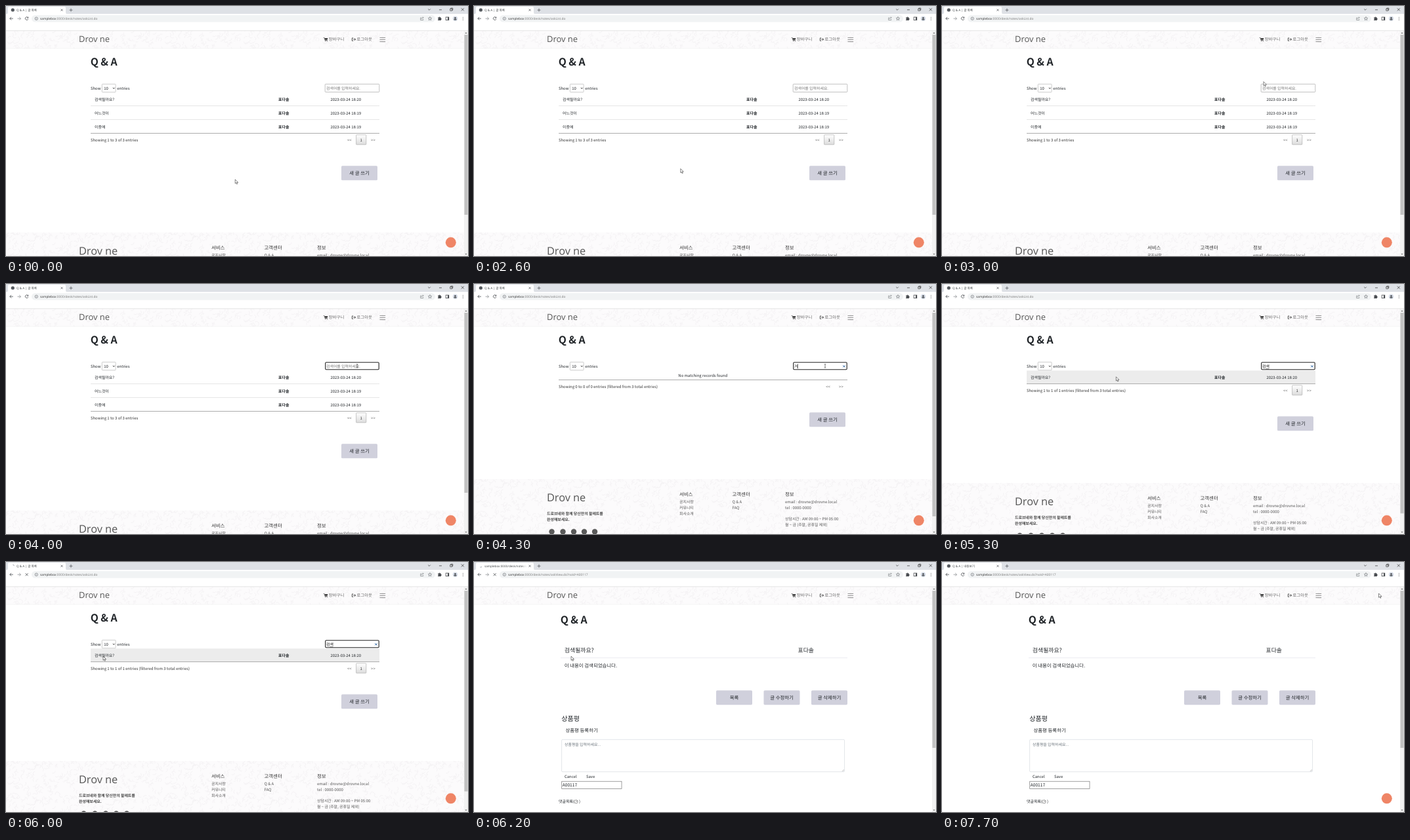
An HTML page for the animation above (7800 ms loop, 704 by 382 pixels).

```html
<!DOCTYPE html>
<html>
<head>
<meta charset="utf-8">
<style>
html, body { margin: 0; width: 100%; height: 100%; overflow: hidden; background: #fff; }
svg { display: block; width: 100vw; height: 100vh; }
text { font-family: "Noto Sans CJK KR", "Noto Sans CJK", "Noto Sans KR", "Noto Sans", sans-serif; white-space: pre; text-rendering: geometricPrecision; }
.ui { font-family: "Open Sans", "Noto Sans CJK KR", "Noto Sans CJK", sans-serif; }
</style>
</head>
<body>
<svg id="stage" viewBox="0 0 704 382" xmlns="http://www.w3.org/2000/svg"></svg>
<script>
const LOOP = 7800, STEP = 100, BODY = 5.93, MID = 7.4;
const INK = '#212529', BRAND = 'Drov ne', WRITER = '표다솔';

const text = (x, cy, str, size = BODY, fill = INK, extra = '') =>
  `<text x="${x}" y="${cy + size * 0.36}" font-size="${size}" fill="${fill}" ${extra}>${str}</text>`;
const center = (x, cy, str, size, fill, extra = '') => text(x, cy, str, size, fill, 'text-anchor="middle" ' + extra);
const rect = (x, y, w, h, fill, extra = '') =>
  `<rect x="${x}" y="${y}" width="${w}" height="${h}" fill="${fill}" ${extra}/>`;
const circle = (x, y, r, fill, extra = '') => `<circle cx="${x}" cy="${y}" r="${r}" fill="${fill}" ${extra}/>`;
const line = (d, stroke, width = 0.7, extra = '') =>
  `<path d="${d}" fill="none" stroke="${stroke}" stroke-width="${width}" ${extra}/>`;
const group = (id, body) => `<g id="${id}">${body}</g>`;
const button = (x, y, label) =>
  rect(x, y, 55, 22, '#d0d0dc', 'rx="1.6"') + center(x + 27.5, y + 11, label, MID);
const BOLD = 'font-weight="700"', MEDIUM = 'font-weight="500"', UI = 'class="ui"';

// Seeded squiggles used behind the header and footer
function squiggles() {
  let seed = 11, d = '';
  const rnd = () => (seed = (seed * 16807) % 2147483647) / 2147483647;
  for (let i = 0; i < 170; i++) {
    const x = 2 + rnd() * 116, y = rnd() * 54, a = rnd() * 6.28, c = Math.cos(a) * 5, s = Math.sin(a) * 5;
    d += `M${x.toFixed(1)} ${y.toFixed(1)}q${(c / 2 - s / 2).toFixed(1)} ${(s / 2 + c / 2).toFixed(1)} ${c.toFixed(1)} ${s.toFixed(1)}`;
  }
  return line(d, '#f5f3f5', 1, 'stroke-linecap="round"');
}

function defs() {
  return `<defs><pattern id="wavy" width="120" height="54" patternUnits="userSpaceOnUse">${rect(0, 0, 120, 54, '#fcfbfc')}${squiggles()}</pattern>
    <linearGradient id="page" x2="0" y2="1"><stop stop-color="#fff"/><stop offset="1" stop-color="#dcdcdc"/></linearGradient>
    <linearGradient id="tabFade"><stop stop-color="#fff" stop-opacity="0"/><stop offset="1" stop-color="#fff"/></linearGradient></defs>`;
}

function browser() {
  const dark = '#4a4d51';
  return rect(0, 0, 704, 12.3, '#dee1e6') +
    rect(0, 12, 704, 26, '#fff') +
    `<path d="M0 12.5q3 0 3-3V3q0-2 2-2h84q2 0 2 2v6.5q0 3 3 3z" fill="#fff"/>` +
    group('favicon', circle(10.3, 6, 2.6, '#55595e')) +
    group('tabSpin', line('M10.3 4a2 2 0 0 1 2 2', '#8a9099', 0.7)) +
    `<text id="tabTitle" class="ui" x="16" y="7.8" font-size="4.6" fill="#3c4043"></text>` +
    rect(72, 2, 9, 9, 'url(#tabFade)') + rect(81, 2, 8, 9, '#fff') +
    line('M83.5 4.7l3 3m0-3l-3 3', dark) + line('M99 3.7v5m-2.5-2.5h5', dark) +
    line('M643.2 4.5l1.8 1.8 1.8-1.8M660 5.8h4M676.8 4.2h3v3h-3zM677.8 4.2v-1h3v3h-1M693.8 3.4l4 4m0-4l-4 4', '#333', 0.7) +
    rect(39, 14, 615, 10.4, '#f1f3f4', 'rx="5.2"') +
    line('M10.8 19.2H5.8m2.3-2.3l-2.3 2.3 2.3 2.3', dark, 0.8) +
    line('M17.5 19.2h5m-2.3-2.3l2.3 2.3-2.3 2.3', '#8b8e92', 0.8) +
    group('reload', line('M33.5 17.7a2.3 2.3 0 1 0 .3 2.2M33.8 16.5v1.8h-1.8', dark, 0.8)) +
    group('stop', line('M29.6 17.2l4 4m0-4l-4 4', dark, 0.8)) +
    circle(46.3, 19.2, 2.2, 'none', 'stroke="#5f6368" stroke-width=".6"') + line('M46.3 18.9v1.5m0-2.4v.6', '#5f6368', 0.5) +
    `<text class="ui" x="52" y="21" font-size="4.8" fill="#777">` +
    `<tspan fill="#333">samplebox</tspan><tspan id="path"></tspan></text>` +
    line('M633 18h-1.3v3.5h4V20m-2.7 0q0-2.2 3-2.3m-1-1.2l1.2 1.2-1.2 1.2', '#5f6368', 0.55) +
    line('M646 16.5l.8 1.7 1.9.2-1.4 1.3.4 1.9-1.7-1-1.7 1 .4-1.9-1.4-1.3 1.9-.2z', '#5f6368', 0.6) +
    `<path d="M658.2 17.5h1.5a.9.9 0 0 1 1.8 0h1.4v1.4a.9.9 0 0 1 0 1.8v1.3h-4.7v-1.4a.8.8 0 0 0 0-1.6z" fill="${dark}"/>` +
    rect(670.2, 17, 4.6, 4.6, 'none', `stroke="${dark}" stroke-width=".8"`) + rect(673, 17, 2, 4.6, dark) +
    circle(684.5, 19.2, 3.7, '#d5dbe6') + circle(684.5, 18.2, 1.2, dark) + rect(682.5, 19.8, 4, 1.7, dark, 'rx=".8"') +
    [17.2, 19.2, 21.2].map(y => circle(696.3, y, 0.5, dark)).join('') +
    rect(0, 37.4, 704, 0.8, '#dcdcdc');
}

function header() {
  const grey = '#6a6a6a';
  return rect(0, 38.2, 698, 26.8, 'url(#wavy)') + rect(0, 64.7, 698, 0.5, '#ebebeb') +
    text(111, 50.5, BRAND, 12.9, '#555', UI) +
    line('M483.8 48.5h1.3l1 4h3.6', '#444', 0.7) + `<path d="M485.4 49h5l-.7 2.7h-3.7z" fill="#444"/>` +
    circle(486.7, 53.6, 0.6, '#444') + circle(489.2, 53.6, 0.6, '#444') +
    text(491.8, 51, '장바구니', 6.4, grey) +
    line('M529.2 48.9h-1.8v4.3h1.8M529.2 51h3.3m-1.5-1.7l1.7 1.7-1.7 1.7', '#444', 0.9) +
    text(534.3, 51, '로그아웃', 6.4, grey) +
    line('M569.5 48.4h8.7m-8.7 3h8.7m-8.7 3.1h8.7', '#555', 0.65);
}

function row(i, title, minute) {
  const y = 142.4 + 21 * i;
  return group('row' + i, text(135, y, title) + text(415, y, WRITER, BODY, INK, BOLD) +
    text(494.5, y, '2023-03-24 18:' + minute) + (i < 2 ? rect(129, 152 + 21 * i, 440, 1, '#e6e6e6') : ''));
}

function footer() {
  const heads = [[313, '서비스'], [393.5, '고객센터'], [474, '정보']];
  const items = [
    [313, 381, '공지사항'], [313, 389.8, '커뮤니티'], [313, 398.6, '회사소개'],
    [393.5, 381, 'Q &amp; A'], [393.5, 389.8, 'FAQ'],
    [474, 381, 'email : drovne@drovne.local'], [474, 389.8, 'tel : 0000-0000'],
    [474, 407.3, '상담시간 : AM 09:00 ~ PM 05:00'], [474, 416, '월 ~ 금 (주말, 공휴일 제외)']];
  return rect(0, 346, 698, 100, 'url(#wavy)') +
    text(111, 373.7, BRAND, 16.3, '#555', UI) +
    heads.map(([x, s]) => text(x, 369.3, s, MID, '#333', MEDIUM)).join('') +
    items.map(([x, y, s]) => text(x, y, s, BODY, '#555')).join('') +
    text(111, 399.3, '드로브네와 함께 당신만의 팔레트를', BODY, '#444', BOLD) +
    text(111, 408, '완성해보세요.', BODY, '#444', BOLD) +
    [118.5, 135.5, 152, 168, 184].map(x => circle(x, 426.5, 4.2, '#5a5a5a')).join('');
}

function listPage() {
  return text(128.7, 85, 'Q &amp; A', 15.7, INK, BOLD) +
    text(129, 125.8, 'Show') + text(169.3, 125.8, 'entries') +
    rect(146.3, 119.3, 20.8, 12.4, '#fff', 'rx="1" stroke="#aaa" stroke-width=".6"') +
    text(149.2, 125.8, '10') + line('M162.8 124.8l1.5 1.5 1.5-1.5', '#222', 0.9) +
    group('idleField', rect(486.2, 119.3, 82.6, 12.2, '#fff', 'rx="1" stroke="#999" stroke-width=".6"')) +
    group('focusField', rect(486.7, 119.8, 81.5, 11, '#fff', 'rx="1.2" stroke="#222" stroke-width="1.1"')) +
    `<text id="query" x="488" y="127.7" font-size="${BODY}"></text>` +
    group('compose', rect(493.4, 129.1, 5, 0.5, '#333')) +
    group('clear', line('M562.3 124.3l3 3m0-3l-3 3', '#1b5799', 0.9)) +
    `<rect id="caret" y="122" width=".5" height="7.5" fill="#111"/>` +
    `<rect id="hover" x="129" y="132.3" width="440" height="20.3" fill="#ececec"/>` +
    row(0, '검색될까요?', 20) + row(1, '어느것이', 19) + row(2, '이중에', 19) +
    group('none', center(348.8, 139.8, 'No matching records found')) +
    group('lower', rect(129, 194, 440, 1, '#adadad') +
      `<text id="info" x="129" y="206.6" font-size="${BODY}" fill="#333"></text>` +
      `<text id="prev" y="206.8" font-size="${BODY}" fill="#666" text-anchor="middle">&lt;&lt;</text>` +
      center(559.4, 204.6, '&gt;&gt;', BODY, '#666') +
      group('one', rect(533.6, 196.8, 15.2, 15, 'url(#page)', 'rx=".7" stroke="#a5a5a5" stroke-width=".6"') + center(541.2, 204.5, '1', BODY, '#333')) +
      button(511, 244.3, '새 글 쓰기') + footer());
}

function viewPage() {
  return text(131.7, 88, 'Q &amp; A', 15.7, INK, BOLD) +
    text(137.8, 134.5, '검색될까요?', 8.9) + text(493.6, 134.5, WRITER, 8.8) +
    rect(132, 146.2, 437, 0.6, '#dfe0ea') +
    text(137.8, 158.5, '이 내용이 검색되었습니다.', MID) +
    button(369, 196.2, '목록') + button(441.5, 196.2, '글 수정하기') + button(514, 196.2, '글 삭제하기') +
    text(133.3, 239.5, '상품평', 10, INK, MEDIUM) + text(139.5, 257.3, '상품평 등록하기', MID) +
    rect(133.6, 271.3, 431, 49.3, '#fff', 'rx="1.5" stroke="#ced4da" stroke-width=".6"') +
    line('M563.7 317l-2.8 2.8m2.8-1.3l-1.3 1.3', '#777', 0.4) +
    text(138, 279, '상품평을 입력하세요...', BODY, '#6c757d') +
    text(138, 328.2, 'Cancel') + text(171, 328.2, 'Save') +
    rect(133.7, 335.2, 91.3, 11.2, '#fff', 'stroke="#777" stroke-width=".7"') +
    text(134.8, 341, 'A00117', 6.6) +
    text(129, 366.2, '댓글목록(', BODY, INK, MEDIUM) + text(160, 366.2, ')', BODY, INK, MEDIUM) +
    circle(155.6, 366.2, 2.6, 'none', 'stroke="#333" stroke-width=".5"') +
    group('hand', line('M155.6 366.2v-2.1', '#333', 0.6));
}

function scrollbar() {
  return rect(698, 38.2, 6, 344, '#f1f1f1') +
    `<path d="M699.5 42l1.5-1.7 1.5 1.7zM699.5 378.5l1.5 1.7 1.5-1.7z" fill="#666"/>` +
    `<rect id="thumb" x="698.5" y="44" width="5" fill="#c1c1c1"/>`;
}

const pointer = `<path d="M0 0v6.2l1.4-1.3 1 2.3 1.1-.5-1-2.2h2z" fill="#fff" stroke="#222" stroke-width=".55"/>`;
const beam = line('M-1.2 -2.8q1.2 0 1.2 .6v4.4q0 .6-1.2 .6M1.2 -2.8q-1.2 0-1.2 .6m0 4.4q0 .6 1.2 .6', '#222', 0.6);

const stage = document.getElementById('stage');
stage.innerHTML = defs() + rect(0, 0, 704, 382, '#fff') + group('list', listPage()) + group('view', viewPage()) +
  header() + browser() + scrollbar() + group('badge', circle(677.8, 361.3, 8, '#ef8566')) +
  group('arrow', pointer) + group('beam', beam);

const el = {};
stage.querySelectorAll('[id]').forEach(n => el[n.id] = n);
const show = (id, on) => el[id].setAttribute('visibility', on ? 'inherit' : 'hidden');
const set = (id, name, v) => el[id].setAttribute(name, v);
const place = (id, x, y) => set(id, 'transform', `translate(${x} ${y})`);
const label = (id, s) => { if (el[id].textContent !== s) el[id].textContent = s; };

// time, x, y of the mouse
const mouse = [
  [0, 349.2, 265], [2599, 349.2, 265], [2600, 314.8, 248.6], [2700, 284, 233], [2800, 310, 208], [2900, 410, 155],
  [3000, 490, 115.6], [3100, 520, 117], [3200, 532, 122], [3300, 535, 125.3], [5100, 535, 125.3],
  [5200, 420, 132], [5300, 265.3, 141.8], [5400, 200, 145.5], [5500, 165, 145.5], [5700, 148, 144],
  [6500, 148, 144], [6700, 215, 128], [7000, 440, 91], [7200, 600, 60], [7400, 665.5, 48], [7800, 665.5, 48]];

function mouseAt(t) {
  const i = mouse.findIndex(m => m[0] > t), a = mouse[i - 1], b = mouse[i];
  const k = (t - a[0]) / (b[0] - a[0]);
  return [a[1] + (b[1] - a[1]) * k, a[2] + (b[2] - a[2]) * k];
}

// start time, typed text, rows left
const typing = [[0, '', 3], [4300, '거', 0], [4400, '검', 1], [4500, '검ㅅ', 0], [4600, '검새', 0], [4700, '검색', 1]];

function render(time) {
  const t = Math.floor(time / STEP) * STEP;
  const [, query, rows] = typing.filter(k => k[0] <= t).pop();
  const view = t >= 6100, loading = t >= 6000 && t < 6600, focus = t >= 3400;
  const lift = rows === 3 ? 0 : rows ? -42 : -48;

  show('list', !view);
  show('view', view);
  show('badge', !view || !loading);
  show('favicon', !loading);
  show('tabSpin', loading);
  set('tabSpin', 'transform', `rotate(${t * 0.6} 10.3 6)`);
  show('reload', !loading);
  show('stop', loading);
  label('tabTitle', !view ? 'Q & A | 글 목록' : loading ? 'samplebox:0000/desk/notes/ask' : 'Q & A | 내용보기');
  label('path', ':0000/desk/notes/' + (view ? 'askView.do?noId=A00117' : 'askList.do'));
  set('thumb', 'height', view ? 240 : 275 - lift * 0.75);

  if (view) {
    set('hand', 'transform', `rotate(${Math.min(t, 7400) * 0.3} 155.6 366.2)`);
  } else {
    show('idleField', !focus);
    show('focusField', focus);
    label('query', query || '검색어를 입력하세요.');
    set('query', 'fill', query ? '#111' : '#777');
    show('clear', query);
    show('compose', query.length > 1);
    show('caret', focus && t < 5200 && !(t >= 4000 && t < 4300));
    set('caret', 'x', 488 + query.length * 5.4);
    for (let i = 0; i < 3; i++) show('row' + i, i < rows);
    show('none', !rows);
    show('hover', t >= 5300);
    place('lower', 0, lift);
    label('info', `Showing ${rows ? 1 : 0} to ${rows} of ${rows} entries` + (rows < 3 ? ' (filtered from 3 total entries)' : ''));
    show('one', rows);
    set('prev', 'x', rows ? 523.3 : 539.6);
  }

  const [x, y] = mouseAt(t), inField = t >= 3200 && t < 5200;
  show('arrow', !inField);
  show('beam', inField);
  place(inField ? 'beam' : 'arrow', x, y);
}

const start = performance.now();
function tick() {
  render((performance.now() - start) % LOOP);
  requestAnimationFrame(tick);
}
tick();
</script>
</body>
</html>
```
